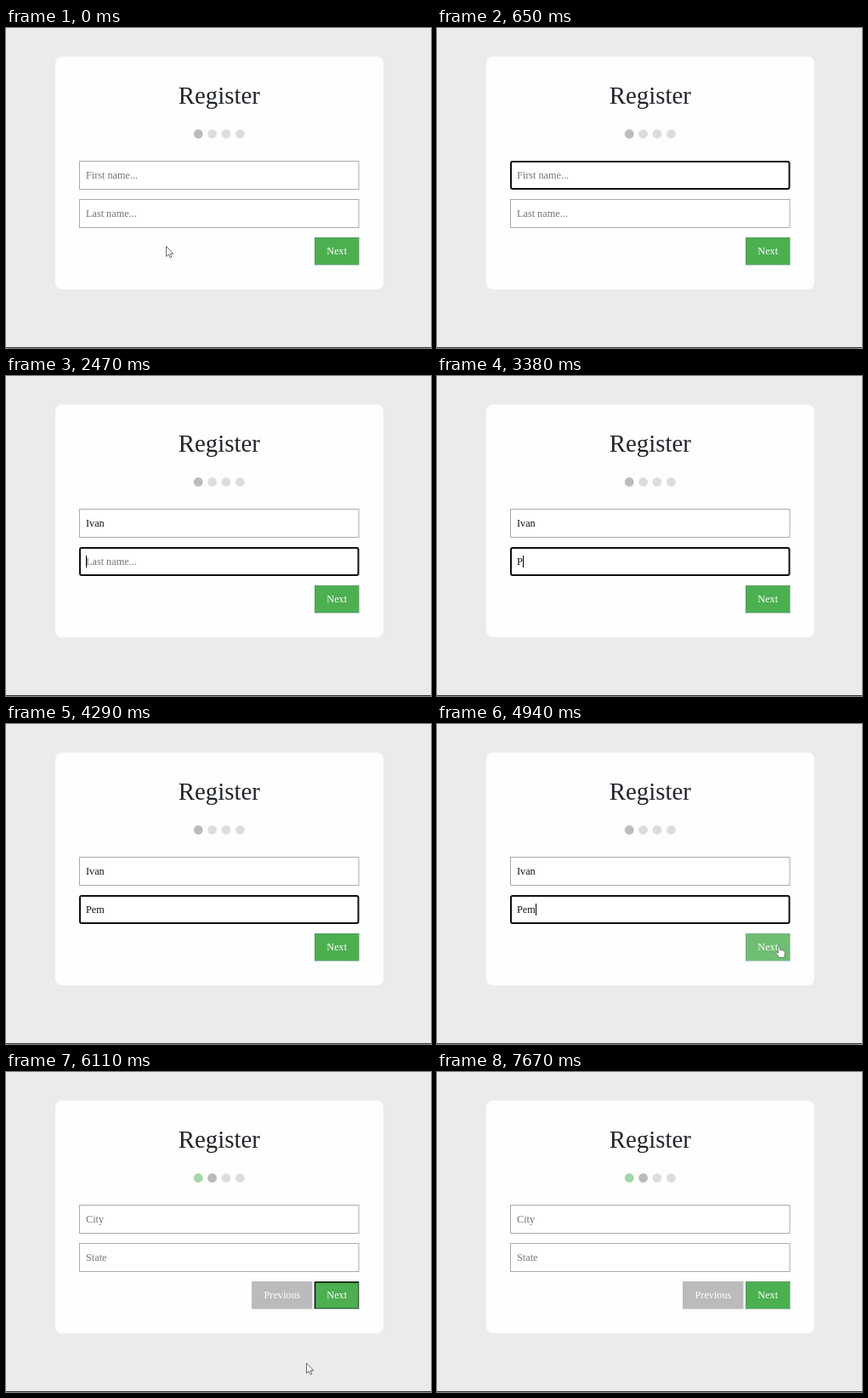
An HTML page for the animation above (7800 ms loop, 500x376 px).

```html
<!DOCTYPE html>
<html lang="en">
<head>
<meta charset="utf-8">
<title>Register form</title>
<style>
  html, body { margin: 0; width: 100%; height: 100%; overflow: hidden; background: #ebebeb; }
  svg { display: block; width: 500px; height: 376px; }
  text { font: 12.24px "Liberation Serif", "Times New Roman", serif; }
  .label { fill: #fff; }
</style>
</head>
<body>
<svg viewBox="0 0 500 376">
  <rect width="500" height="376" fill="#ebebeb"/>
  <rect y="375" width="500" height="1" fill="#333"/>
  <rect x="58" y="33.5" width="386" height="273.5" rx="8" fill="#fefefe"/>
  <text x="250.8" y="89" text-anchor="middle" fill="#212529" style="font-size:28.8px">Register</text>
  <g id="dots"></g>
  <g id="fields"></g>
  <g id="previous">
    <rect x="289" y="246" width="71.5" height="32.5" fill="#bbb"/>
    <text class="label" x="303.5" y="266">Previous</text>
  </g>
  <g id="next">
    <rect x="363.5" y="246.5" width="51.5" height="31.5" fill="#4caf50" stroke="#5b9a66"/>
    <text class="label" x="377.3" y="266">Next</text>
  </g>
  <g id="ring" fill="none" stroke="#111">
    <path d="M363.5 278V247H415" stroke-width="1.6"/>
    <path d="M414.5 247V277.5H364" stroke-dasharray="1 1"/>
  </g>
  <path id="arrow" d="M0 0V12L2.8 9.5L4.6 13.4L6.4 12.6L4.7 8.8H8.3Z" fill="#fff" stroke="#444" stroke-width=".8"/>
  <path id="hand" d="M3 1Q4.1 -.6 5.2 1V4.4Q6.3 3.7 7.1 4.8Q8.4 4.2 9.1 5.4Q10.8 5 11 6.8V9Q11 11 9.6 13.3H4.6Q2.6 10.8 .4 8.2Q.2 6.7 1.6 7L3 8.3Z" fill="#fff" stroke="#555" stroke-width=".7"/>
</svg>
<script>
const LOOP = 7800;
const $ = id => document.getElementById(id);

function add(parent, tag, attributes) {
  const node = document.createElementNS("http://www.w3.org/2000/svg", tag);
  setAll(node, attributes);
  return parent.appendChild(node);
}
function setAll(node, attributes) {
  for (const key in attributes) node.setAttribute(key, attributes[key]);
}
function show(node, visible) {
  node.setAttribute("visibility", visible ? "visible" : "hidden");
}

const dots = [0, 1, 2, 3].map(i =>
  add($("dots"), "circle", { cx: 226.2 + i * 16.4, cy: 124.5, r: 5.4 }));

const fields = [
  { y: 156, hints: ["First name...", "City"], value: "Ivan", keys: [1560, 1820, 1950, 2080],
    focus: [130, 2470], blink: [[650, 1170]] },
  { y: 201, hints: ["Last name...", "State"], value: "Pem", keys: [3380, 3640, 3770],
    focus: [2470, 5460], blink: [[2990, 3380], [4290, 4940]] }
].map(field => ({
  ...field,
  box: add($("fields"), "rect", { fill: "#fff" }),
  text: add($("fields"), "text", { x: 94, y: field.y + 21.3 }),
  caret: add($("fields"), "rect", { y: field.y + 10, width: 1, height: 14 })
}));

// Pointer positions as [start, shape, x, y]
const pointer = [
  [0, "arrow", 188.5, 256.5], [130, ""],
  [4940, "hand", 398.3, 261.2], [5070, "hand", 397.5, 261.2],
  [5200, "hand", 396.6, 261.2], [5460, "hand", 395.8, 261.2],
  [5980, "arrow", 369, 316], [6110, "arrow", 353.5, 342],
  [6240, "arrow", 346, 356], [6370, "arrow", 341, 368], [6500, ""]
];

const within = (t, [from, to]) => t >= from && t < to;

function drawField(field, t, page) {
  const focused = within(t, field.focus);
  setAll(field.box, focused
    ? { x: 87, y: field.y + 1, width: 327.5, height: 32, rx: 2, stroke: "#101010", "stroke-width": 2 }
    : { x: 86.5, y: field.y + .5, width: 328.5, height: 33, rx: 0, stroke: "#aaa", "stroke-width": 1 });

  const typed = page ? "" : field.value.slice(0, field.keys.filter(key => t >= key).length);
  field.text.textContent = typed || field.hints[page];
  field.text.setAttribute("fill", typed ? "#111" : "#757575");
  field.caret.setAttribute("x", typed ? Math.round(94 + field.text.getComputedTextLength()) : 94);
  show(field.caret, focused && !field.blink.some(span => within(t, span)));
}

function draw(t) {
  const page = t >= 5590 ? 1 : 0;
  dots.forEach((dot, i) =>
    dot.setAttribute("fill", i < page ? "#a6d7a8" : i === page ? "#bbb" : "#ddd"));
  fields.forEach(field => drawField(field, t, page));

  show($("previous"), page);
  $("next").setAttribute("opacity", within(t, [4940, 5980]) ? .8 : 1);
  show($("ring"), within(t, [5460, 7670]));

  const [, shape, x, y] = pointer.filter(([start]) => t >= start).pop();
  for (const id of ["arrow", "hand"]) show($(id), id === shape);
  if (shape) $(shape).setAttribute("transform", `translate(${x} ${y})`);
}

function tick() {
  draw(performance.now() % LOOP);
  requestAnimationFrame(tick);
}
tick();
</script>
</body>
</html>
```
